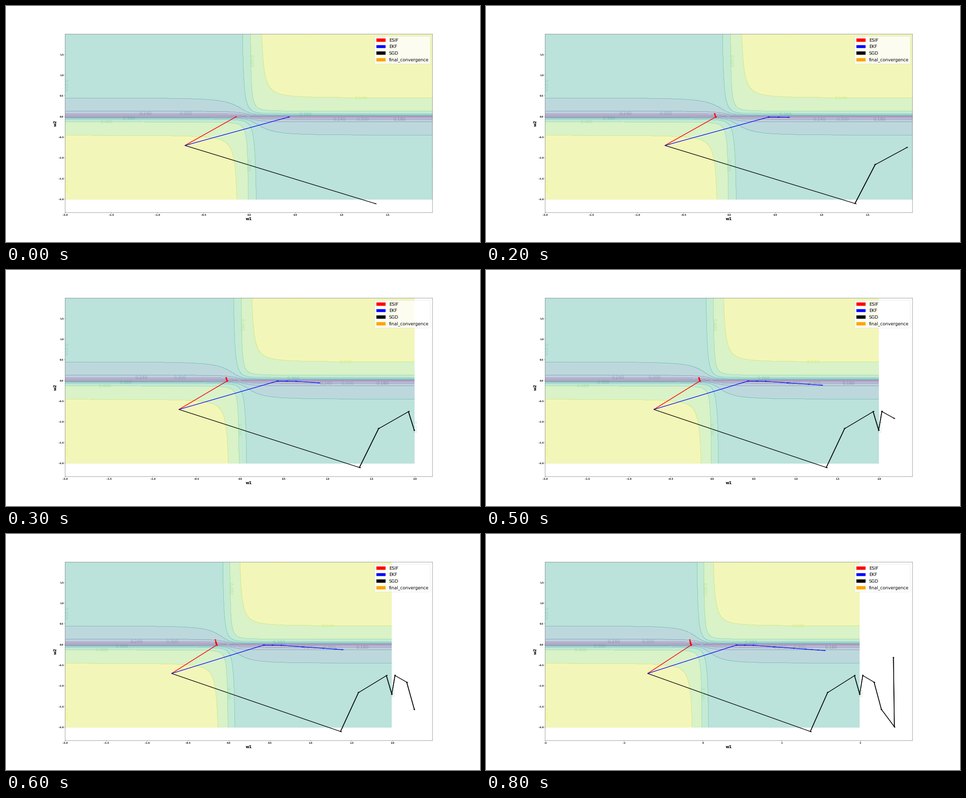
A matplotlib script for the animation above (0.9 s loop, 1058 by 529 pixels).

```python
import numpy as np
import matplotlib.pyplot as plt
from matplotlib.animation import FuncAnimation
from matplotlib.patches import Patch

plt.rcParams["font.family"] = "DejaVu Sans"
plt.rcParams["font.weight"] = "bold"
plt.rcParams["text.hinting"] = "none"

LOW, HIGH = -2.0, 1.99
LEVELS = np.arange(2, 11) * 0.06
MARGIN = 0.05
START = (-0.7, -0.7)
STEPS = 9

# shape of the loss: depth and width of the valley, size of the twist
DEPTH, WIDTH, TWIST = 0.303, 0.0389, 0.09

LEGEND = [("red", "ESIF"), ("blue", "EKF"), ("black", "SGD"),
          ("orange", "final_convergence")]


def loss(x, y):
    valley = DEPTH * np.arctan(np.hypot(y, 0.026) / WIDTH)
    twist = TWIST * x / np.hypot(x, 0.11) * np.tanh(y / 0.03)
    return valley + twist


def hopping_path():
    """Small decaying hops off the valley floor, with one late kick."""
    n = np.arange(1, STEPS + 1)
    hops = 0.075 * np.exp(-0.17 * (n - 2)) * (n % 2 == 0)
    kick = 0.12 * np.exp(-4 * (n - 7) ** 2)
    y = hops + kick - 0.012
    return np.column_stack([-0.151 - 0.13 * y, y])


def gliding_path():
    """Slow, fast, slow along the valley, drifting down past a bend."""
    n = np.arange(1, STEPS + 1)
    x = np.interp(n, [1, 3, 5, 6, 9], [0.421, 0.636, 1.152, 1.304, 1.538])
    y = -0.016 - 0.14 * np.maximum(x - 0.62, 0)
    return np.column_stack([x, y])


def wandering_path():
    return np.array([(1.364, -2.104), (1.583, -1.165), (1.925, -0.753),
                     (1.991, -1.200), (2.030, -0.750), (2.173, -0.910),
                     (2.266, -1.567), (2.431, -1.990), (2.419, -0.320)])


def add_label(ax, level, x, y, rotation=0):
    shade = (level - LEVELS[0]) / (LEVELS[-1] - LEVELS[0])
    ax.text(x, y, f"{level:.3f}", rotation=rotation, size=20,
            weight="normal", color=plt.cm.viridis(shade), alpha=0.3,
            ha="center", va="center", clip_on=True, zorder=3)


def label_contours(ax):
    rows = {0.18: [1.63], 0.24: [-1.13, 0.98], 0.30: [-0.69, 1.23],
            0.36: [-1.31, 0.61], 0.48: [-1.55], 0.54: [1.21]}
    for level, xs in rows.items():
        for x in xs:
            # low levels sit on the shallow side, the rest on the steep one
            if level < 0.33:
                y = -0.07 * np.sign(x)
            else:
                y = WIDTH * np.tan((level - TWIST) / DEPTH) * np.sign(x)
            add_label(ax, level, x, y)

    add_label(ax, 0.60, 0.617, HIGH)
    for level, x, y in [(0.48, 0.02, 1.35), (0.48, -0.01, -1.18),
                        (0.42, LOW, 0.755), (0.60, LOW, -1.675),
                        (0.42, HIGH, -1.125)]:
        add_label(ax, level, x, y, rotation=270)


def draw_surface(ax):
    grid = np.linspace(LOW, HIGH, 400)
    x, y = np.meshgrid(grid, grid)
    z = loss(x, y)
    ax.contourf(x, y, z, LEVELS, cmap="viridis", alpha=0.3)
    ax.contour(x, y, z, LEVELS, cmap="viridis", alpha=0.3, linewidths=1)
    label_contours(ax)


def make_arrows(ax, points, color):
    stops = np.vstack([START, points])
    return [ax.arrow(*a, *(b - a), width=0.008, head_width=0.02,
                     head_length=0.0225, color=color, zorder=2.5)
            for a, b in zip(stops, stops[1:])]


fig = plt.figure(figsize=(30, 15), dpi=35.2667, facecolor="white")
ax = fig.add_axes([0.125, 0.125, 0.775, 0.755])
draw_surface(ax)
tracks = [make_arrows(ax, hopping_path(), "red"),
          make_arrows(ax, gliding_path(), "blue"),
          make_arrows(ax, wandering_path(), "black")]

ax.set_xlabel("w1", size=18, weight="bold")
ax.set_ylabel("w2", size=18, weight="bold")
ax.legend(handles=[Patch(color=c, label=name) for c, name in LEGEND],
          loc="upper right", prop={"size": 20, "weight": "normal"})

lowest = min(a.get_xy()[:, 1].min() for track in tracks for a in track)
ax.set_ylim(lowest - MARGIN * (HIGH - lowest), HIGH)


def update(step):
    right = HIGH
    for track in tracks:
        for i, arrow in enumerate(track):
            arrow.set_visible(i <= step)
            if i <= step:
                right = max(right, arrow.get_xy()[:, 0].max())
    # pad only once the path leaves the surface
    pad = MARGIN * (right - LOW) if right > HIGH else 0
    ax.set_xlim(LOW, right + pad)
    return []


anim = FuncAnimation(fig, update, frames=STEPS, interval=100,
                     init_func=lambda: update(0), repeat=True,
                     repeat_delay=0, blit=False)
plt.show()
```
